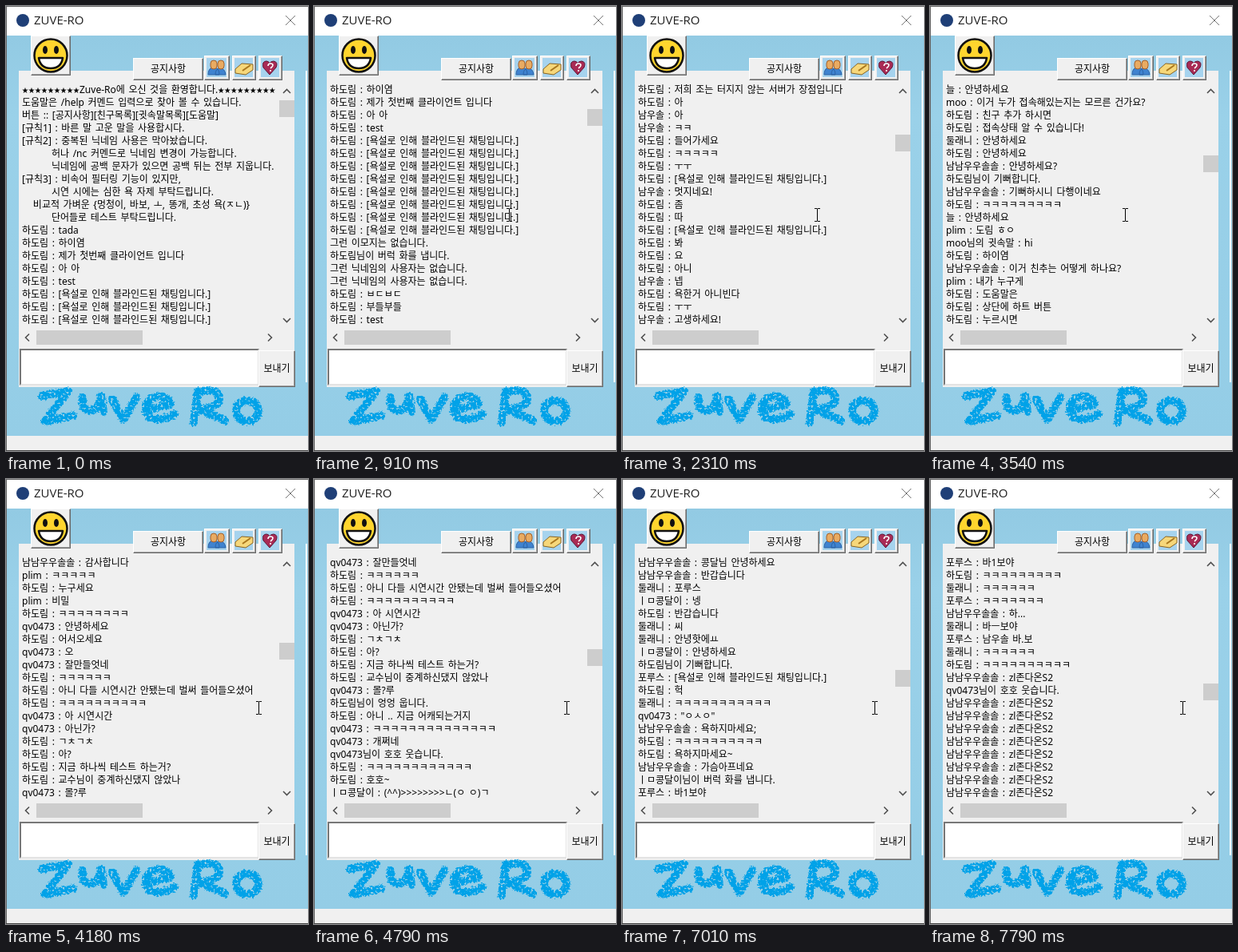
An HTML page that plays this animation: 378 px wide and 557 px high, repeating every 8000 ms.

```html
<!DOCTYPE html>
<html lang="ko">
<head>
<meta charset="utf-8">
<title>ZUVE-RO</title>
<style>
  html, body { margin: 0; width: 100%; height: 100%; overflow: hidden; }
  #stage {
    position: relative; width: 378px; height: 557px; overflow: hidden;
    background: linear-gradient(#92cae3 37px, #9ad1e9 140px, #94cde6 538px);
    font: 12px/16px "Noto Sans", "Noto Sans CJK KR", sans-serif;
  }
  #stage > * { position: absolute; box-sizing: border-box; }
  svg { left: 0; top: 0; }
  .panel { left: 16px; top: 81px; width: 345px; height: 396px; background: #f0f0f0; }
  .button {
    background: #f0f0f0; border: 1px solid; border-color: #fff #696969 #696969 #fff;
    box-shadow: inset -1px -1px #a0a0a0;
    display: flex; align-items: center; justify-content: center; font-size: 12px;
  }
  .input {
    left: 17px; top: 429px; width: 300px; height: 46px; background: #fff;
    border: 2px solid; border-color: #777 #e3e3e3 #e3e3e3 #777;
  }
  #chat {
    left: 20px; top: 97px; width: 321px; height: 307px; overflow: hidden;
    white-space: pre; word-spacing: 1.5px; color: #000;
  }
  #chat small { font-size: 8px; line-height: 0; position: relative; top: -1px; }
  #thumb { left: 342px; top: 118px; width: 19px; height: 21px; background: #cdcdcd; }
</style>
</head>
<body>
<div id="stage">
  <div class="panel"></div>
  <div class="button" style="left:31px;top:37px;width:50px;height:50px"></div>
  <div class="button" style="left:159px;top:65px;width:88px;height:28px">공지사항</div>
  <div class="button" style="left:248px;top:62px;width:32px;height:31px"></div>
  <div class="button" style="left:283px;top:62px;width:30px;height:31px"></div>
  <div class="button" style="left:316px;top:62px;width:30px;height:31px"></div>
  <div class="input"></div>
  <div class="button" style="left:316px;top:431px;width:46px;height:46px">보내기</div>
  <div id="chat"></div>
  <div id="thumb"></div>

  <svg width="378" height="557" fill="none">
    <defs>
      <filter id="crayon" x="-5%" y="-20%" width="110%" height="140%">
        <feTurbulence type="fractalNoise" baseFrequency=".35" numOctaves="2" seed="4" result="noise"/>
        <feDisplacementMap in="SourceGraphic" in2="noise" scale="6" xChannelSelector="R" yChannelSelector="G" result="rough"/>
        <feColorMatrix in="noise" values="0 0 0 0 0  0 0 0 0 0  0 0 0 0 0  0 0 9 0 -2.7" result="grain"/>
        <feComposite in="rough" in2="grain" operator="in"/>
      </filter>
    </defs>

    <!-- window frame -->
    <path fill="#fff" d="M0 0H378V37H0zM375 81h2v390h-2z"/>
    <path fill="#f0f0f0" d="M0 538H378V557H0z"/>
    <path stroke="#666" d="M0 .5H378M.5 0V557"/>
    <path stroke="#444" d="M0 556.5H378"/>
    <circle cx="21" cy="18" r="8" fill="#1f3f77"/>
    <text x="35" y="23" fill="#222" font-family="Open Sans, sans-serif" font-size="15" word-spacing="0">ZUVE-RO</text>
    <path stroke="#777" d="M350 12l12 12m0-12l-12 12"/>

    <!-- smiley -->
    <g stroke="#111" stroke-width="2.5">
      <circle cx="56" cy="62" r="20.5" fill="#ffd52e"/>
      <path fill="#fff" stroke-linejoin="round" d="M41 65H71Q69 78 56 78T41 65z"/>
    </g>
    <g fill="#111">
      <ellipse cx="49" cy="55" rx="3" ry="5"/>
      <ellipse cx="63" cy="55" rx="3" ry="5"/>
    </g>

    <!-- toolbar icons -->
    <path fill="#a6d3ee" d="M251 65h25v24h-25zM286 65h23v24h-23zM319 65h23v24h-23z"/>
    <g stroke="#2b62a5">
      <path fill="#3f83cf" d="M253 86q0-9 7-9t7 9zM262 86q0-8 6-8t7 8z"/>
      <path fill="#e9ab62" stroke="#a4602a" d="M256 72a4 4 0 1 1 8 0v3a4 4 0 0 1-8 0zM265 72a4 4 0 1 1 8 0v3a4 4 0 0 1-8 0z"/>
    </g>
    <path fill="#f6d77a" stroke="#8a6420" d="M287 79l8-7 14 1v7l-9 6-13-2z"/>
    <path stroke="#a9761d" stroke-width="2" d="M296 81l10-7"/>
    <path fill="#a92b55" stroke="#5d1735" d="M330 86l-8-9q-2-8 4-8 3 0 4 3 1-3 5-3 6 1 3 8z"/>
    <path stroke="#fff" stroke-width="1.6" d="M328 75q0-3 3-3t3 2-3 4m0 2v2"/>

    <!-- scrollbars -->
    <path fill="#cdcdcd" d="M38 406H171V424H38z"/>
    <path stroke="#505050" stroke-width="1.6" d="M347 109l4.500-4.500 4.500 4.500M347 391l4.500 4.500 4.500-4.500M29 410.500l-4.500 4.500 4.500 4.500M328 410.500l4.500 4.500-4.500 4.500"/>

    <!-- painted name -->
    <g filter="url(#crayon)" stroke="#00a2e8" stroke-width="10" stroke-linecap="round" stroke-linejoin="round">
      <path d="M45 488L78 482 48 520 84 513"/>
      <path d="M96 490q-2 18 11 16 11-3 12-18l3 20"/>
      <path d="M133 492L147 518 163 490"/>
      <path d="M177 506L206 498Q198 484 182 491 168 502 180 515 194 521 211 511"/>
      <path d="M235 521L240 483Q270 477 267 494 262 504 241 504L274 519"/>
      <ellipse cx="302" cy="507" rx="14" ry="13"/>
    </g>

    <g id="arrow"><path fill="#fff" stroke="#000" d="M.5.5v16l4-4 3 6 2-1-3-6h5z"/></g>
    <g id="beam"><path stroke="#000" d="M-3 -7.500h3l.5 1 .5-1h3M.5-7v15M-3 8.500h3l.5-1 .5 1h3"/></g>
  </svg>
</div>

<script>
const names = {
  h: '하도림', n: '남우솔', m: 'moo', d: '둘래니', w: '남남우우솔솔',
  p: 'plim', q: 'qv0473', k: 'ㅣㅁ콩달이', y: '포루스', e: '늘'
};

// "x:" is a speaker, "#" a blocked message, "ㅋ9" nine laughs, "*8" repeats the line
const script = `<small>★★★★★★★★★</small>Zuve-Ro에 오신 것을 환영합니다.<small>★★★★★★★★★</small>
도움말은 /help 커멘드 입력으로 찾아 볼 수 있습니다.
버튼 :: [공지사항][친구목록][귓속말목록][도움말]
[규칙1] : 바른 말 고운 말을 사용합시다.
[규칙2] : 중복된 닉네임 사용은 막아놨습니다.
        허나 /nc 커멘드로 닉네임 변경이 가능합니다.
        닉네임에 공백 문자가 있으면 공백 뒤는 전부 지웁니다.
[규칙3] : 비속어 필터링 기능이 있지만,
        시연 시에는 심한 욕 자제 부탁드립니다.
   비교적 가벼운 {멍청이, 바보, ㅗ, 똥개, 초성 욕(ㅈㄴ)}
        단어들로 테스트 부탁드립니다.
h:tada
h:하이염
h:제가 첫번째 클라이언트 입니다
h:아 아
h:test
h:#*8
그런 이모지는 없습니다.
하도림님이 버럭 화를 냅니다.
그런 닉네임의 사용자는 없습니다.*2
h:ㅂㄷㅂㄷ
h:부들부들
h:test
h:#*2
h:아 아
h:테스트 중입니다
n:안녕하세요
h:안녕하세요
n:ㅋ4
h:잘 보이시나요
n:네 잘 보입니다
h:ㅋ6
하도림님이 기뻐합니다.
n:오
h:#
n:신기하네요
h:감사합니다
h:그리고
h:저희 조는 터지지 않는 서버가 장점입니다
h:아
n:아
n:ㅋㅋ
h:들어가세요
h:ㅋ5
h:ㅜㅜ
h:#
n:멋지네요!
h:좀
h:따
h:#
h:봐
h:요
h:아니
n:넵
h:욕한거 아니빈다
h:ㅜㅜ
n:고생하세요!
h:감사합니다
h:ㅋ5
m:안녕하세요
h:안녕하세요
m:오 잘 되네요
h:ㅋ7
d:하이
w:안녕하세요
h:반갑습니다
e:안녕하세요
m:이거 누가 접속해있는지는 모르른 건가요?
h:친구 추가 하시면
h:접속상태 알 수 있습니다!
d:안녕하세요
h:안녕하세요
w:안녕하세요?
하도림님이 기뻐합니다.
w:기뻐하시니 다행이네요
h:ㅋ9
e:안녕하세요
p:도림 ㅎㅇ
moo님의 귓속말 : hi
h:하이염
w:이거 친추는 어떻게 하나요?
p:내가 누구게
h:도움말은
h:상단에 하트 버튼
h:누르시면
h:나옵니다
w:감사합니다
p:ㅋ5
h:누구세요
p:비밀
h:ㅋ8
q:안녕하세요
h:어서오세요
q:오
q:잘만들엇네
h:ㅋ6
h:아니 다들 시연시간 안됐는데 벌써 들어들오셨어
h:ㅋ10
q:아 시연시간
q:아닌가?
h:ㄱㅊㄱㅊ
h:아?
h:지금 하나씩 테스트 하는거?
h:교수님이 중계하신댔지 않았나
q:몰?루
하도림님이 엉엉 웁니다.
h:아니 .. 지금 어캐되는거지
q:ㅋ14
q:개쩌네
qv0473님이 호호 웃습니다.
h:ㅋ12
h:호호~
k:(^^)>>>>>>>>ㄴ(ㅇ ㅇ)ㄱ
h:ㅋ8
k:안녕하세요
h:안녕하세요
d:ㅋ5
y:하이
k:ㅎㅇ
h:어서오세요
q:ㅋ9
y:안녕하세요
d:안녕하세요
w:콩달님 안녕하세요
w:반갑습니다
d:포루스
k:넹
h:반갑습니다
d:씨
d:안녕핫에ㅛ
k:안녕하세요
하도림님이 기뻐합니다.
y:#
h:헉
d:ㅋ11
q:"ㅇㅅㅇ"
w:욕하지마세요;
h:ㅋ10
h:욕하지마세요~
w:가슴아프네요
ㅣㅁ콩달이님이 버럭 화를 냅니다.
y:바1보야
h:ㅋ9
d:ㅋ6
y:ㅋ7
w:하...
d:바ㅡ보야
y:남우솔 바.보
d:ㅋ6
h:ㅋ10
w:zl존다온S2
qv0473님이 호호 웃습니다.
w:zl존다온S2*8`;

const lines = script.split('\n').flatMap(raw => {
  const [, body, times = 1] = raw.match(/^(.*?)(?:\*(\d+))?$/);
  const line = body
    .replace(/^(\w):/, (_, key) => names[key] + ' : ')
    .replace('#', '[욕설로 인해 블라인드된 채팅입니다.]')
    .replace(/ㅋ(\d+)/, (_, n) => 'ㅋ'.repeat(n));
  return Array(+times).fill(line);
});

// wheel bursts: start, interval, then the top line after each step
const bursts = [
  [510, 100, 3, 9], [910, 80, 12, 18], [1310, 75, 21, 27, 30],
  [2090, 73, 34, 38, 43, 47], [2550, 75, 51, 57, 63], [3100, 80, 66, 72],
  [3540, 80, 75, 78, 81, 84, 84, 87, 90, 93, 95, 97], [4720, 70, 100, 103],
  [5280, 75, 106, 109, 112], [5810, 85, 115, 119, 123], [6530, 70, 126, 129],
  [7010, 70, 132, 135, 138], [7550, 80, 141, 144, 147, 150]
];
const scrolls = bursts.flatMap(([start, gap, ...tops]) =>
  tops.map((top, i) => [start + i * gap, top]));

const pointer = [
  [140, 'arrow', 336, 509], [215, 'beam', 291, 388], [290, 'beam', 244, 261],
  [3860, 'beam', 280, 274], [3940, 'beam', 316, 286]
];

const LOOP = 8000, ROWS = 19, THUMB_STEP = 0.92;
const $ = id => document.getElementById(id);
const latest = (list, t) => list.findLast(([start]) => start <= t);
let shownTop = -1;

function draw() {
  const t = performance.now() % LOOP;

  const top = latest(scrolls, t)?.[1] ?? 0;
  if (top !== shownTop) {
    $('chat').innerHTML = lines.slice(top, top + ROWS).join('\n');
    $('thumb').style.top = 118 + Math.round(top * THUMB_STEP) + 'px';
    shownTop = top;
  }

  const [, kind, x, y] = latest(pointer, t) ?? [];
  for (const id of ['arrow', 'beam']) {
    $(id).style.display = id === kind ? '' : 'none';
    if (id === kind) $(id).setAttribute('transform', `translate(${x} ${y})`);
  }
  requestAnimationFrame(draw);
}
draw();
</script>
</body>
</html>
```
